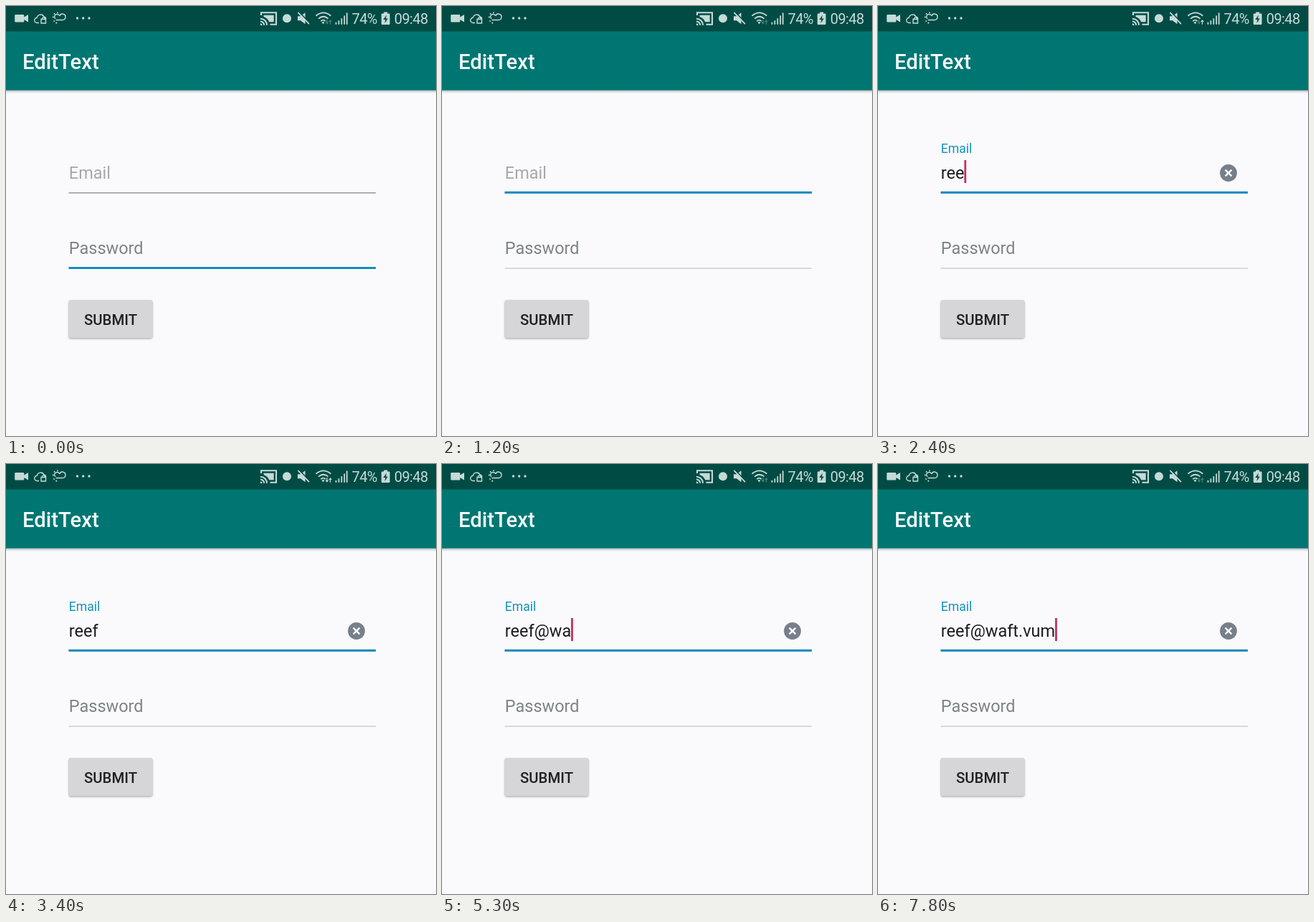
An HTML page for the animation above (8 s loop, 600 by 600 pixels).

```html
<!DOCTYPE html>
<html lang="en">
<head>
<meta charset="utf-8">
<title>Form input</title>
<style>
  html, body { margin: 0; width: 100%; height: 100%; overflow: hidden; background: #faf9fc; }
  svg { display: block; width: 100vw; height: 100vh; }
  text { font-family: Roboto, sans-serif; font-size: 23.5px; }
  .medium { font-weight: 500; }
  .clock { font-size: 20px; letter-spacing: -.6px; }
  .icon { fill: #c6dad7; }
  .line { fill: none; stroke: #c6dad7; stroke-width: 1.8; }
  .thin { stroke-width: 1.4; }
  .focus { fill: #0f8abf; }
</style>
</head>
<body>
<svg viewBox="0 0 600 600">
  <defs>
    <linearGradient id="shade" x2="0" y2="1">
      <stop stop-color="#8f9c9d"/>
      <stop offset=".4" stop-color="#d3d6d9"/>
      <stop offset="1" stop-color="#faf9fc"/>
    </linearGradient>
    <filter id="soft" x="-10%" y="-20%" width="120%" height="140%">
      <feGaussianBlur stdDeviation="1.3"/>
    </filter>
  </defs>

  <rect width="600" height="600" fill="#faf9fc"/>
  <rect y="117" width="600" height="5" fill="url(#shade)"/>
  <rect y="35" width="600" height="82.5" fill="#007672"/>
  <rect width="600" height="35.5" fill="#004c45"/>
  <text x="23" y="88" class="medium" style="font-size:29.3px" fill="#f4faf9">EditText</text>

  <!-- status bar, left -->
  <path class="icon" d="M13.5 12h10.5q1.3 0 1.3 1.3v2.2l5.7-3.4v10.3l-5.7-3.4v2.2q0 1.3-1.3 1.3H13.5q-1.3 0-1.3-1.3v-7.9q0-1.3 1.3-1.3z"/>
  <path class="line thin" d="M46 23.5h-2.5a3.6 3.6 0 0 1-.3-7.2a5.2 5.2 0 0 1 9.8-1.3q2.6.5 2.6 3M49 18.5h6.5v5.5H49zM50.5 18.5v-1.2a1.8 1.8 0 0 1 3.5 0v1.2"/>
  <path class="line thin" d="M69.5 19.5h9.3a4.2 4.2 0 1 0-4-5.6M69 17.8a3.6 3.6 0 1 1 5.4-4.6"/>
  <path class="line" d="M65 15.5h1.6M67 10.3l1.2 1.2M72 8.5v1.5M66.5 21.5l1.2-1M70 24.5l.6-1.7"/>
  <g class="icon">
    <circle cx="99.5" cy="17" r="1.7"/><circle cx="107.7" cy="17" r="1.7"/><circle cx="116" cy="17" r="1.7"/>
  </g>

  <!-- status bar, right -->
  <path class="line" style="stroke-width:2.1" d="M356 13V9.3h21v16.4h-8.5M355 17.7a9 9 0 0 1 9 9M355 21.5a5.2 5.2 0 0 1 5.2 5.2"/>
  <path class="icon" d="M359.5 12.7h14.2v9.6h-6.5q-2-5.3-7.7-7.3zM355 24.3a2.6 2.6 0 0 1 2.6 2.6H355z"/>
  <circle class="icon" cx="392" cy="17.3" r="6"/>
  <path class="icon" d="M407 14.3h4l6.5-5v16l-6.5-5h-4z"/>
  <path class="line" stroke-width="2" d="M407.5 9l15.5 16"/>
  <path d="M409 8.3l15 15.5" stroke="#004c45" stroke-width="1.3"/>
  <path class="line" d="M432.5 13.8q10.4-8.8 20.8 0M436 17.6q6.9-5.8 13.6 0M439.2 21.1q3.6-3 6.5 0"/>
  <path class="icon" d="M440.5 22.8q2-1.5 4 0l-2 2.4z"/>
  <path id="down" d="M447.2 19h1.3v3.6h1.8l-2.4 3.2l-2.5-3.2h1.8z"/>
  <path id="up" d="M451.8 25.7h1.3v-3.6h1.8l-2.4-3.2l-2.5 3.2h1.8z"/>
  <path class="line" stroke-width="2" d="M460.5 25.8v-3M464.4 25.8v-5.5M468.3 25.8v-8.5M472.2 25.8V13.6M475.7 25.8V9.5"/>
  <text x="482.6" y="25.3" class="clock icon">74%</text>
  <path class="icon" d="M527.2 8.5h5v2h2.2q1.2 0 1.2 1.2v13.1q0 1.2-1.2 1.2H525q-1.2 0-1.2-1.2V11.700q0-1.200 1.200-1.200h2.200z"/>
  <path d="M531 12.500l-4.700 6.500h3l-1 5l4.700-6.600h-3z" fill="#004c45"/>
  <text x="541.8" y="25.300" class="clock icon">09:48</text>

  <!-- email field -->
  <rect x="87.500" y="259.900" width="428.500" height="1.600" fill="#9b9a9d"/>
  <rect id="emailLine" class="focus" y="258.700" height="2.900"/>
  <text id="label" x="87.800">Email</text>
  <text id="value" x="87.800" y="240.500" fill="#1d1c1f"></text>
  <rect id="caret" y="215" width="2.800" height="32" fill="#c5305c"/>
  <g id="clear">
    <circle cx="489" cy="233" r="11.900" fill="#76808a"/>
    <path d="M484.600 228.600l8.800 8.800m0-8.800l-8.800 8.800" stroke="#faf9fc" stroke-width="2.500"/>
  </g>

  <!-- password field -->
  <text x="87.800" y="346" fill="#7d8583">Password</text>
  <rect x="87.500" y="365.300" width="428.500" height="1.500" fill="#cfced2"/>
  <rect id="passwordLine" class="focus" y="364.100" height="2.900"/>

  <rect x="87.500" y="411.500" width="117" height="53" rx="3" fill="#a9a8ab" filter="url(#soft)"/>
  <rect x="87.500" y="410.300" width="117" height="53" rx="2.500" fill="#d6d5d8"/>
  <text x="146" y="444.700" class="medium" style="font-size:20.400px" text-anchor="middle" fill="#212023">SUBMIT</text>
</svg>
<script>
  const LOOP = 8000, STEP = 100, BLINK = 500;
  const FOCUS = 700, LEFT = 87.5, WIDTH = 428.5;
  const email = 'reef@waft.vum';
  const keyTimes = [1700, 2100, 2400, 2900, 4000, 4900, 5300, 5800, 6200, 6600, 7100, 7500, 7800];

  const el = id => document.getElementById(id);
  const set = (id, attrs) => {
    for (const name in attrs) el(id).setAttribute(name, attrs[name]);
  };
  const mix = (a, b, p) => a + (b - a) * p;
  const ease = (t, from, to) => {
    const p = Math.min(1, Math.max(0, (t - from) / (to - from)));
    return p * p * (3 - 2 * p);
  };
  const show = (id, on) => set(id, { visibility: on ? 'visible' : 'hidden' });

  // The focus bar grows from and shrinks to the middle of the field.
  const bar = (id, p) => set(id, { x: LEFT + WIDTH * (1 - p) / 2, width: WIDTH * p });
  const arrow = (id, on) => set(id, { fill: on ? '#c6dad7' : '#45807a' });

  function draw(t) {
    const typed = keyTimes.filter(k => k <= t).length;
    const lastInput = typed ? keyTimes[typed - 1] : FOCUS;
    const focus = ease(t, 670, 970);
    const lift = ease(t, 1670, 1880);

    bar('emailLine', focus);
    bar('passwordLine', 1 - focus);

    const tint = [[167, 15], [169, 147], [168, 183]].map(([a, b]) => Math.round(mix(a, b, lift)));
    set('label', { y: mix(240.5, 205.3, lift), fill: `rgb(${tint})` });
    el('label').style.fontSize = mix(23.5, 17.6, lift) + 'px';

    el('value').textContent = email.slice(0, typed);
    const end = typed ? el('value').getComputedTextLength() : 0;
    set('caret', { x: 87.7 + end });
    show('caret', t >= FOCUS && (t - lastInput) % (2 * BLINK) < BLINK);
    show('clear', typed > 0);

    arrow('up', t >= 1700 && t < 3700);
    arrow('down', t >= 2700 && t < 3700);
  }

  function tick() {
    const t = performance.now() % LOOP;
    draw(Math.floor(t / STEP) * STEP);
    requestAnimationFrame(tick);
  }
  tick();
</script>
</body>
</html>
```
